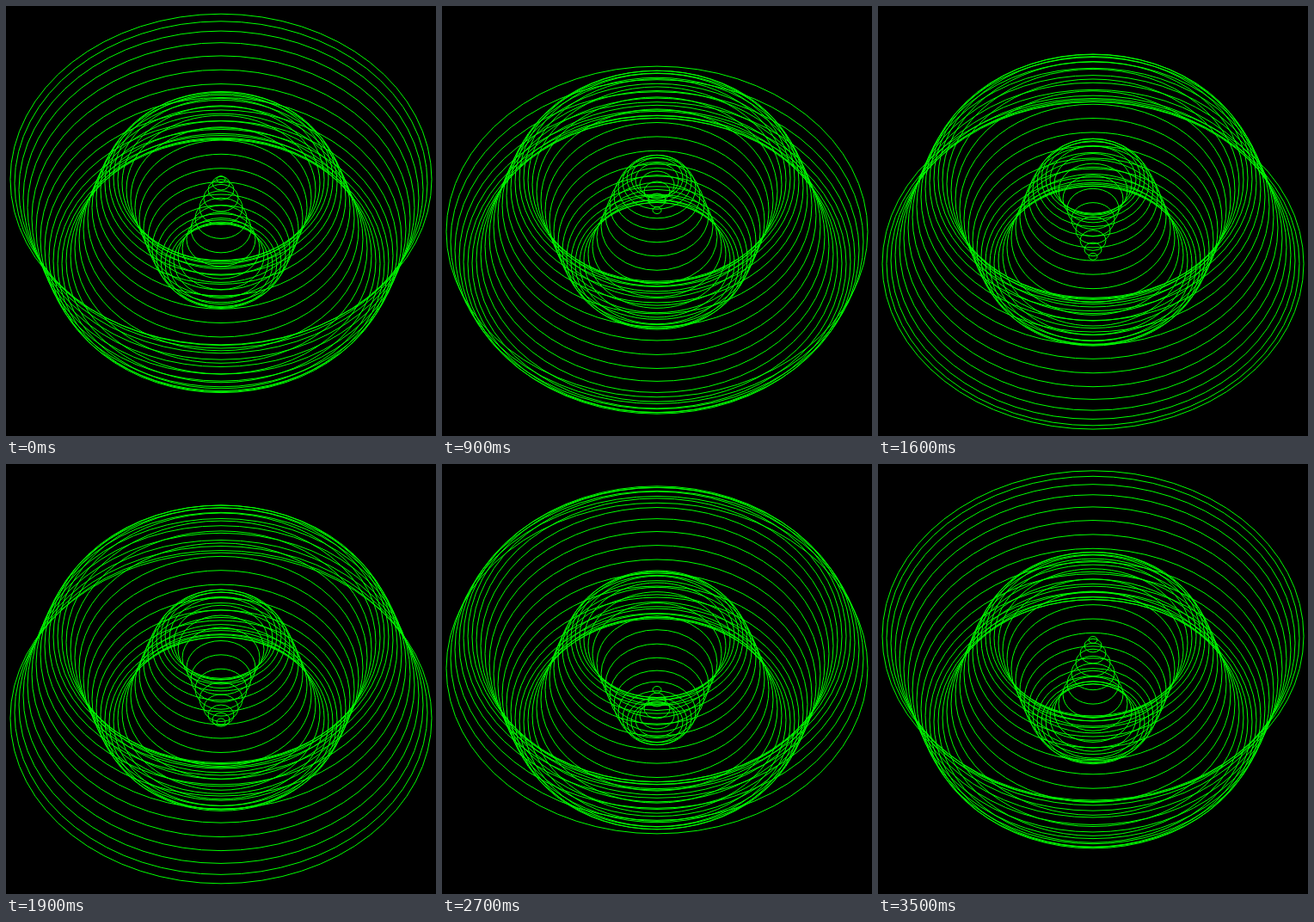
These frames come from a looping animation (500x500 px, 3600 ms). An HTML page with a canvas:

```html
<!DOCTYPE html>
<html lang="en">
<head>
<meta charset="utf-8">
<title>Ripple rings</title>
<style>
  html, body { margin: 0; width: 100%; height: 100%; overflow: hidden; background: #000; }
  canvas { display: block; width: 500px; height: 500px; }
</style>
</head>
<body>
<canvas id="stage" width="500" height="500"></canvas>
<script>
  const ctx = document.getElementById('stage').getContext('2d');
  const LOOP = 3600, STEP = 100;
  const RINGS = 49, GAP = 5, TILT = 0.785;
  const SWING = 50, RINGS_PER_WAVE = 25;
  const TAU = Math.PI * 2;

  // Each ring bobs vertically, lagging behind the ring inside it.
  function draw(time) {
    ctx.fillStyle = '#000';
    ctx.fillRect(0, 0, 500, 500);
    ctx.strokeStyle = '#0f0';
    ctx.lineWidth = 1;
    for (let k = 1; k <= RINGS; k++) {
      const phase = TAU * (time / LOOP - k / RINGS_PER_WAVE);
      const rx = k * GAP;
      ctx.beginPath();
      ctx.ellipse(250, 250 - SWING * Math.cos(phase), rx, rx * TILT, 0, 0, TAU);
      ctx.stroke();
    }
  }

  const start = performance.now();
  let shown = -1;

  function tick() {
    const elapsed = Math.max(0, performance.now() - start) % LOOP;
    const time = Math.floor(elapsed / STEP) * STEP;
    if (time !== shown) draw(shown = time);
    requestAnimationFrame(tick);
  }
  tick();
</script>
</body>
</html>
```
